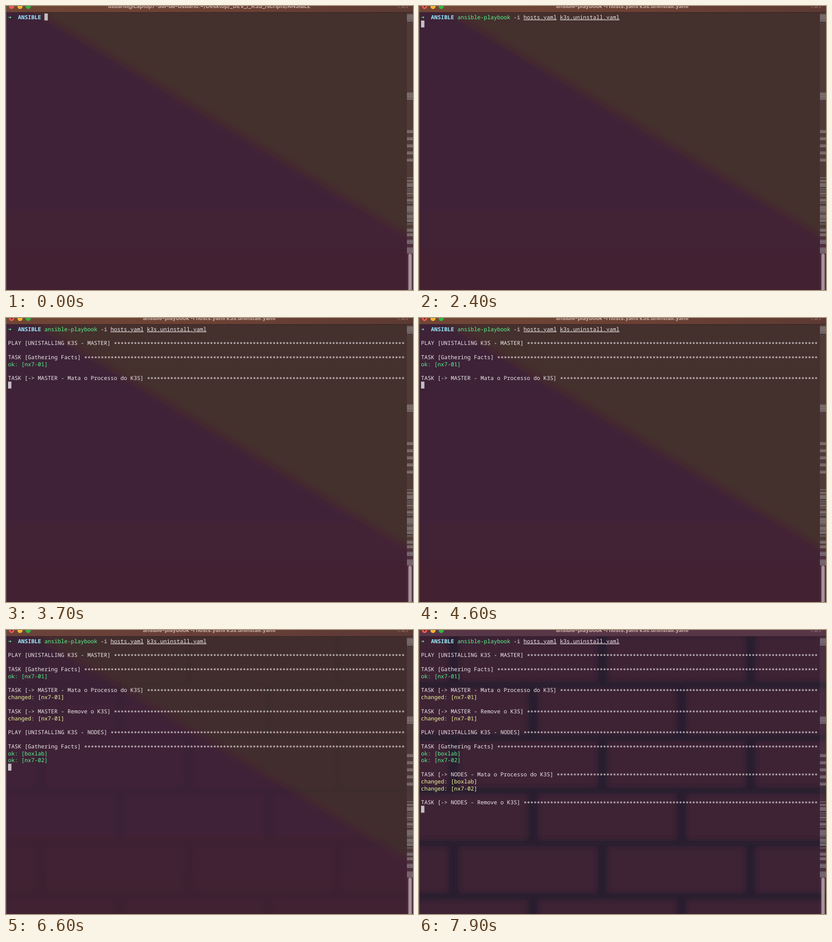
An HTML page for the animation above (8000 ms loop, 800x559 px).

```html
<!DOCTYPE html>
<html lang="pt">
<head>
<meta charset="utf-8">
<title>Terminal</title>
<style>
html, body { margin: 0; width: 100%; height: 100%; overflow: hidden; background: #412234; }
svg { display: block; width: 100vw; height: 100vh; }
text { white-space: pre; text-rendering: geometricPrecision; }
.term { font: 500 10.83px "Noto Sans Mono", "DejaVu Sans Mono", monospace; fill: #efe9eb; font-variant-ligatures: none; }
.green { fill: #5af78e; }
.yellow { fill: #f3f99d; }
.cyan { fill: #9aedfe; font-weight: 700; }
.file { text-decoration: underline; text-decoration-thickness: 1px; text-underline-offset: 2px; }
.title { font: 700 10.7px Inter, "Liberation Sans", sans-serif; fill: #cbb1a6; }
.keys { font: 9px "DejaVu Sans", sans-serif; fill: #98786c; }
</style>
</head>
<body>
<svg id="stage" viewBox="0 0 800 559" preserveAspectRatio="none">
  <defs>
    <linearGradient id="wall" gradientUnits="userSpaceOnUse" x1="387" y1="243" x2="410" y2="205">
      <stop offset="0" stop-color="#452034"/>
      <stop offset=".45" stop-color="#462731"/>
      <stop offset="1" stop-color="#44302d"/>
    </linearGradient>
    <linearGradient id="shade" x2="0" y2="1">
      <stop offset="0" stop-color="#3b2538"/>
      <stop offset=".45" stop-color="#402137"/>
      <stop offset=".65" stop-color="#412237"/>
      <stop offset=".8" stop-color="#432333"/>
      <stop offset="1" stop-color="#422332"/>
    </linearGradient>
    <linearGradient id="bar">
      <stop offset="0" stop-color="#704637"/>
      <stop offset=".6" stop-color="#6a4034"/>
      <stop offset="1" stop-color="#5c3a33"/>
    </linearGradient>
    <filter id="soft" filterUnits="userSpaceOnUse" x="-60" y="-60" width="920" height="680">
      <feGaussianBlur stdDeviation="5"/>
    </filter>
  </defs>
  <rect width="800" height="559" fill="url(#wall)"/>
  <path d="M-60 -54L840 488V620H-60Z" fill="url(#shade)" filter="url(#soft)"/>
  <rect width="800" height="13" fill="url(#bar)"/>
  <g id="bricks" opacity="0">
    <rect width="800" height="559" fill="#3e2335"/>
    <g id="mortar" stroke="#281f2f" fill="none" filter="url(#soft)"/>
    <rect width="800" height="13" fill="#573648"/>
  </g>
  <rect y="12" width="800" height="1" fill="#2d1b20" opacity=".7"/>
  <rect width="1" height="559" fill="#85727d" opacity=".65"/>
  <circle cx="11" cy="1" r="5" fill="#ef5b50"/>
  <circle cx="27.5" cy="1" r="5" fill="#f5b62e"/>
  <circle cx="43.7" cy="1" r="5" fill="#32b643"/>
  <circle id="busy" cx="11" cy="1" r="1.8" fill="#7c1c18"/>
  <text id="title" class="title" x="399.5" y="4.2" text-anchor="middle"></text>
  <text class="keys" x="791" y="4" text-anchor="end">⌥⌘1</text>
  <rect x="788" y="13" width="12" height="546" fill="#fff" opacity=".06"/>
  <path id="marks" stroke="#93898c" stroke-width="1.2"/>
  <rect x="791" y="487.5" width="6.5" height="80" rx="3.2" fill="#a8919b"/>
  <g id="output" class="term"></g>
  <rect id="cursor" width="6.6" height="13.6" fill="#c5bec3"/>
</svg>
<script>
const LOOP = 8000, COL = 6.5, ROW = 13.8, LEFT = 4, COLUMNS = 120;
const PASTE = 600, ENTER = 1700, FADE_START = 6350, FADE_END = 7700;
const command = "ansible-playbook -i hosts.yaml k3s.uninstall.yaml";
const shellTitle = "usuario@Laptop7-Sol-de-Usuario:~/Desktop/_DEV_/_K3S_/scripts/ANSIBLE";
const byId = id => document.getElementById(id);
const lines = [];

function add(tag, parent, attrs, content = "") {
  const node = document.createElementNS("http://www.w3.org/2000/svg", tag);
  for (const key in attrs) node.setAttribute(key, attrs[key]);
  node.textContent = content;
  parent.append(node);
  return node;
}

function write(time, row, column, content, style = "", drop = 0) {
  const node = add("text", byId("output"), {
    x: LEFT + column * COL, y: 25.8 + row * ROW + drop, class: style
  }, content);
  lines.push({ time, row, node });
}

function heading(time, row, label) {
  write(time, row, 0, label);
  const start = label.length + 1;
  write(time, row, start, "*".repeat(COLUMNS - start), "", 1.7);
}

const ok = (time, row, host) => write(time, row, 0, `ok: [${host}]`, "green");
const changed = (time, row, host) => write(time, row, 0, `changed: [${host}]`, "yellow");

write(0, 0, 0, "➜", "green");
write(0, 0, 3, "ANSIBLE", "cyan");
write(PASTE, 0, 11, "ansible-playbook", "green");
write(PASTE, 0, 28, "-i");
write(PASTE, 0, 31, "hosts.yaml", "file");
write(PASTE, 0, 42, "k3s.uninstall.yaml", "file");
heading(2700, 2, "PLAY [UNISTALLING K3S - MASTER]");
heading(2700, 4, "TASK [Gathering Facts]");
ok(3500, 5, "nx7-01");
heading(3500, 7, "TASK [-> MASTER - Mata o Processo do K3S]");
changed(4700, 8, "nx7-01");
heading(4700, 10, "TASK [-> MASTER - Remove o K3S]");
changed(5700, 11, "nx7-01");
heading(5700, 13, "PLAY [UNISTALLING K3S - NODES]");
heading(5700, 15, "TASK [Gathering Facts]");
ok(6300, 16, "boxlab");
ok(6600, 17, "nx7-02");
heading(6700, 19, "TASK [-> NODES - Mata o Processo do K3S]");
changed(7300, 20, "boxlab");
changed(7500, 21, "nx7-02");
heading(7600, 23, "TASK [-> NODES - Remove o K3S]");

// Brick courses, every other one shifted by half a brick
for (let course = 0; course < 6; course++) {
  const top = 4 + course * 104;
  add("path", byId("mortar"), { d: `M-40 ${top}H840`, "stroke-width": 13 });
  for (let x = course % 2 ? 224 : 68; x < 830; x += 292)
    add("path", byId("mortar"), { d: `M${x} ${top}v104`, "stroke-width": 19 });
}

// Scrollbar marks: first y and number of lines
const groups = [[17, 7], [171, 7], [245, 3], [259, 3], [273, 3], [287, 3], [301, 3],
  [338, 1], [343, 2], [349, 4], [360, 1], [364, 1], [368, 2], [374, 1], [380, 3],
  [388, 1], [394, 6], [407, 1], [411, 4], [420, 3], [429, 1], [439, 3], [448, 3],
  [461, 4], [476, 6]];
byId("marks").setAttribute("d", groups.map(([y, count]) =>
  Array.from({ length: count }, (_, i) => `M788 ${y + i * 2.1}h12`).join("")).join(""));

function draw(time) {
  let last = 0;
  for (const line of lines) {
    const shown = time >= line.time;
    line.node.setAttribute("visibility", shown ? "visible" : "hidden");
    if (shown) last = Math.max(last, line.row);
  }
  const running = time >= ENTER;
  const column = running ? 0 : time >= PASTE ? 11 + command.length : 11;
  byId("cursor").setAttribute("x", LEFT + column * COL);
  byId("cursor").setAttribute("y", 14.8 + (running ? last + 1 : 0) * ROW);
  byId("title").textContent = running ? command : shellTitle;
  byId("busy").setAttribute("visibility", running ? "visible" : "hidden");
  const fade = (time - FADE_START) / (FADE_END - FADE_START);
  byId("bricks").setAttribute("opacity", Math.min(1, Math.max(0, fade)));
}

const start = performance.now();
function tick() {
  draw((performance.now() - start) % LOOP);
  requestAnimationFrame(tick);
}
tick();
</script>
</body>
</html>
```
